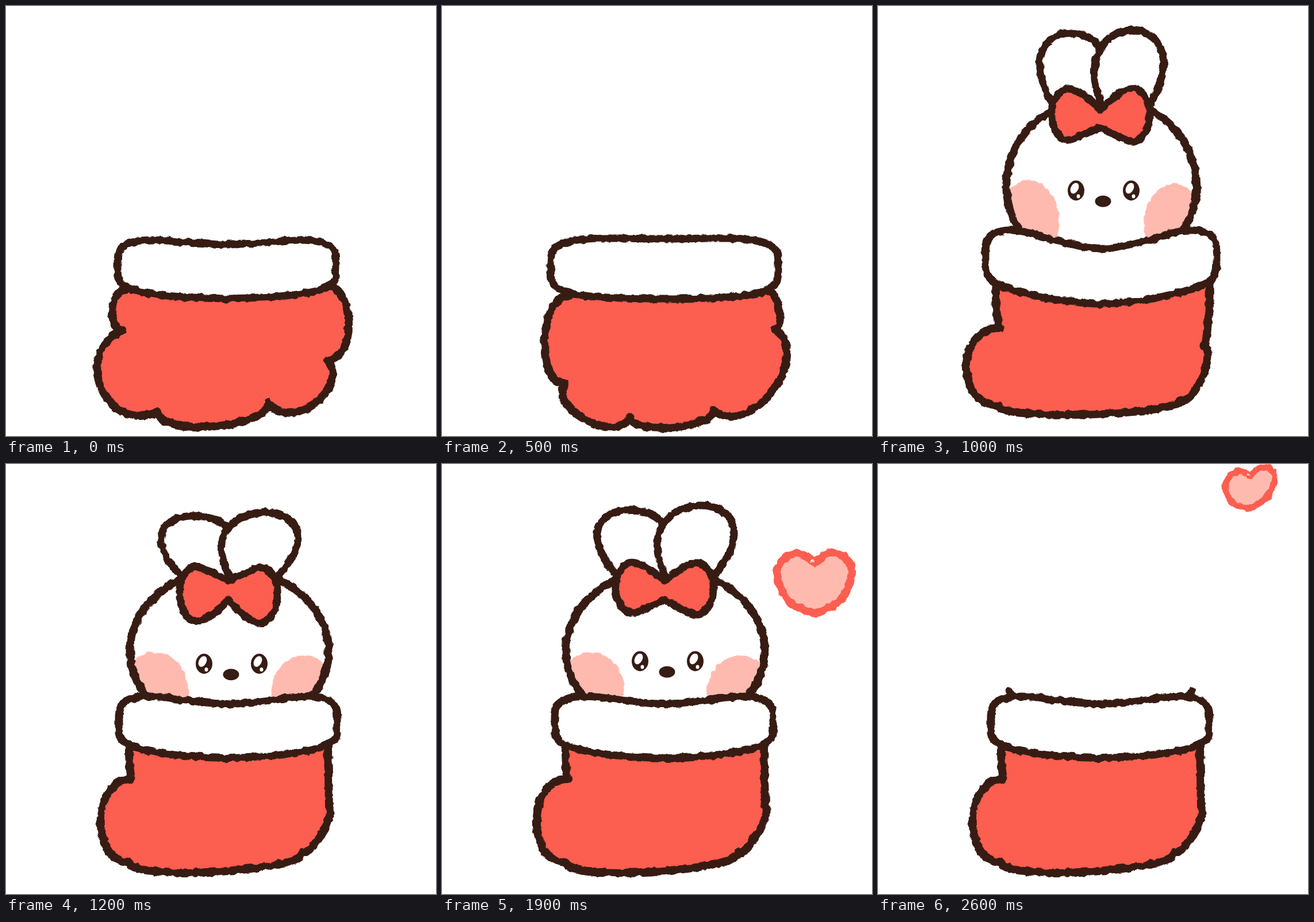
Recreate the animation shown at these times as an HTML page. Size 748 by 748 pixels, loop 2700 ms.

```html
<!DOCTYPE html>
<html lang="en">
<head>
<meta charset="utf-8">
<title>Bunny in a stocking</title>
<style>
  html, body { margin: 0; width: 100%; height: 100%; overflow: hidden; background: #fff; }
  svg { display: block; width: 100vw; height: 100vh; }
  .ink { stroke: #371c14; stroke-width: 14; stroke-linecap: round; stroke-linejoin: round; }
  .thin { stroke-width: 13; }
  .white { fill: #fff; }
  .red { fill: #fc5e50; }
  .pink { fill: #ffbab0; }
  .dark { fill: #371c14; }
  .none { fill: none; }
  #heart { stroke: #fc5e50; stroke-linejoin: round; }
</style>
</head>
<body>
<svg viewBox="0 0 748 748">
  <defs>
    <filter id="rough" filterUnits="userSpaceOnUse" x="0" y="0" width="748" height="748" color-interpolation-filters="sRGB">
      <feTurbulence id="noise" type="fractalNoise" baseFrequency=".09" numOctaves="2" seed="2"/>
      <feDisplacementMap in="SourceGraphic" scale="7" xChannelSelector="R" yChannelSelector="G"/>
    </filter>
    <clipPath id="inHead"><ellipse id="headClip"/></clipPath>
    <clipPath id="above"><rect y="-10" width="748" height="470"/></clipPath>
    <g id="eye">
      <ellipse class="dark" rx="14.5" ry="17.5"/>
      <ellipse class="white" rx="6.5" ry="10" transform="translate(-2.5 -4) rotate(28)"/>
      <ellipse class="white" cx="4" cy="10" rx="3" ry="3.6"/>
    </g>
  </defs>
  <g id="bunny" clip-path="url(#above)">
    <g filter="url(#rough)">
      <ellipse id="headFill" class="white"/>
      <g clip-path="url(#inHead)">
        <ellipse id="cheekL" class="pink"/>
        <ellipse id="cheekR" class="pink"/>
      </g>
      <ellipse id="head" class="ink none"/>
      <path id="earL" class="ink thin white"/>
      <path id="earR" class="ink thin white"/>
      <path id="bow" class="ink thin red"/>
    </g>
    <g id="face">
      <use href="#eye" x="344.5"/>
      <use href="#eye" x="440.5"/>
      <ellipse class="dark" cx="391.5" cy="18.8" rx="14" ry="10"/>
    </g>
  </g>
  <g filter="url(#rough)">
    <path id="nubs" class="ink thin none" d="M228 394l10 11M546 394l-10 11"/>
    <path id="body" class="ink red"/>
    <path id="cuff" class="ink thin white"/>
    <path id="heart" class="pink"/>
  </g>
</svg>
<script>
const $ = id => document.getElementById(id);
const { PI, sin, cos, abs, max, min, sign, hypot } = Math;
const attrs = (id, o) => { for (const k in o) $(id).setAttribute(k, o[k]); };
const show = (id, on) => { $(id).style.display = on ? '' : 'none'; };
const lerp = (a, b, w) => a + (b - a) * w;

// blends numbers, arrays and objects alike
function mix(a, b, w) {
  if (typeof a === 'number') return lerp(a, b, w);
  if (Array.isArray(a)) return a.map((v, i) => mix(v, b[i], w));
  return Object.fromEntries(Object.keys(a).map(k => [k, mix(a[k], b[k], w)]));
}

// body: corners [x, y] joined by arcs, each with its bulge
const lumpA = {
  body: [[208, 494], [203, 565, .38], [264, 706, .64], [456, 690, .23], [560, 616, .5], [556, 486, .39]],
  cuff: { x: 384, y: 462, w: 190, h: 47, bend: 14 }
};
const lumpB = {
  body: [[222, 504], [213, 657, .34], [327, 715, .41], [472, 703, .22], [580, 562, .46], [568, 497, .25]],
  cuff: { x: 387, y: 457, w: 198, h: 52, bend: 4 }
};
const bagUp = {
  body: [[200, 478], [206, 572, .1], [205, 698, .65], [540, 695, .055], [573, 590, .28], [590, 470, .09]],
  cuff: { x: 390, y: 476, w: 212, h: 49, bend: 66 }
};
const bagRest = {
  body: [[215, 490], [219, 548, .05], [215, 693, .48], [515, 676, .11], [562, 595, .18], [560, 487, 0]],
  cuff: { x: 386, y: 464.5, w: 190, h: 47, bend: 21 }
};

// ears: lean and height; bow wings: top and bottom
const up = {
  head: { x: 389, y: 300, w: 158, h: 165 }, cheek: { y: 351, w: 42, h: 70 }, face: 299,
  earY: 150, spread: 105, earL: [-5, 136], earR: [3, 138],
  knot: [157, 187], wingL: [118, 207], wingR: [115, 210]
};
const calm = {
  head: { x: 388.5, y: 325, w: 173, h: 142 }, cheek: { y: 394, w: 56, h: 64 }, face: 343,
  earY: 195, spread: 150, earL: [-27, 115], earR: [26, 123],
  knot: [203, 236], wingL: [172, 259], wingR: [173, 262]
};

const heartLow = { x: 659, y: 266, w: 48, h: 60, lean: -34, tilt: -.1, line: 14 };
const heartMid = { x: 648, y: 207, w: 65, h: 53, lean: 0, tilt: -.02, line: 14 };
const heartTop = { x: 647, y: 43, w: 43, h: 34, lean: 0, tilt: -.18, line: 11 };

// closed smooth curve; points are [x, y, sharp]
function loop(p) {
  const at = i => p[(i + p.length) % p.length];
  const ctrl = (i, dir) => [0, 1].map(k => at(i)[k] + (at(i)[2] ? 0 : (at(i + 1)[k] - at(i - 1)[k]) * dir / 6));
  return `M${p[0][0]} ${p[0][1]}` + p.map((_, i) =>
    'C' + [...ctrl(i, 1), ...ctrl(i + 1, -1), at(i + 1)[0], at(i + 1)[1]].map(v => v.toFixed(1)).join(' ')).join('');
}

function scallops(c) {
  return `M${c[0]}` + c.slice(1).map(([x, y, bulge], i) => {
    const [px, py] = c[i], nx = (py - y) * bulge, ny = (x - px) * bulge;
    return `C${px + nx} ${py + ny} ${x + nx} ${y + ny} ${x} ${y}`;
  }).join('');
}

// rounded bar whose ends curl upwards, the top edge more than the bottom
function bean({ x, y, w, h, bend }) {
  const round = v => sign(v) * abs(v) ** .5;
  return loop(Array.from({ length: 40 }, (_, i) => {
    const a = 2 * PI * i / 40, u = round(cos(a)), v = round(sin(a));
    return [x + w * u, y + h * v - bend * (1 - cos(PI * u)) / 2 * (.75 - .25 * v)];
  }));
}

function ear(side, baseY, spread, [lean, height]) {
  const inner = 389, outer = inner + side * 84, mid = (inner + outer) / 2 + lean;
  const top = baseY - height / .75;
  return `M${inner} ${baseY}C${mid - side * spread} ${top} ${mid + side * spread} ${top} ${outer} ${baseY}`;
}

function bow([top, bottom], left, right) {
  const wing = [[34, .08], [62, 0], [83, .28], [82, .72], [60, 1], [28, .88]];
  const place = (side, [a, b]) => wing.map(([x, v]) => [387 + side * x, lerp(a, b, v)]);
  return loop([[387, top, 1], ...place(-1, left), [387, bottom, 1], ...place(1, right).reverse()]);
}

function heart({ x, y, w, h, lean, tilt }) {
  const half = [[.4, -.97], [.78, -.85], [1, -.32], [.69, .58]];
  const put = (u, v, sharp) => [x + u * w + lean * max(0, v) ** 2, y + v * h + u * w * tilt, sharp];
  return loop([put(0, -.68, 1), ...half.map(([u, v]) => put(-u, v)),
    put(0, 1, 1), ...half.map(([u, v]) => put(u, v)).reverse()]);
}

const rise = s => max(0, 1 - abs(s - 8) / 4);

function bagAt(s) {
  return s < 7 ? mix(lumpA, lumpB, sin(.3 * PI * s) ** 2) : mix(bagRest, bagUp, rise(s));
}

function bunnyAt(s) {
  const b = mix(calm, up, s < 8 ? 1 : rise(s));
  const squash = max(0, 1 - abs(s - 12) / 2);
  const sway = s > 12 && s < 25 ? cos(PI * (s - 16) / 6) : 0;
  const shift = ([a, c], da, dc) => [a + da, c + dc];
  return {
    ...b,
    face: b.face + 4.5 * squash,
    earL: shift(b.earL, -14 * sway, -10 * squash - 15 * sway),
    earR: shift(b.earR, -22 * sway, -12 * squash),
    wingL: shift(b.wingL, 7 * squash + 8 * sway, 14 * squash + 8 * sway),
    wingR: shift(b.wingR, 7 * squash - 12 * sway, 14 * squash - 8 * sway)
  };
}

function heartAt(s) {
  const early = max(0, 16 - s), late = max(0, s - 19) / 7;
  const h = late ? mix(heartMid, heartTop, late) : mix(heartLow, heartMid, max(0, s - 16) / 3);
  return { ...h, x: h.x + 28 * (sin(early) + sin(PI * late)), y: h.y + 20 * early };
}

function drawBunny(s) {
  const b = bunnyAt(s), { x, y, w, h } = b.head;
  const dy = 80 * max(0, 8 - s) ** 2 + 28 * max(0, s - 23) ** 2;
  for (const id of ['headFill', 'headClip', 'head']) attrs(id, { cx: x, cy: y + dy, rx: w, ry: h });
  for (const [id, side] of [['cheekL', -1], ['cheekR', 1]]) {
    const cx = x + side * .74 * w, cy = b.cheek.y + side * 3 + dy;
    attrs(id, { cx, cy, rx: b.cheek.w, ry: b.cheek.h, transform: `rotate(${8 * side} ${cx} ${cy})` });
  }
  const lower = v => v + dy;
  attrs('earL', { d: ear(-1, b.earY + dy, b.spread, b.earL) });
  attrs('earR', { d: ear(1, b.earY + dy, b.spread, b.earR) });
  attrs('bow', { d: bow(b.knot.map(lower), b.wingL.map(lower), b.wingR.map(lower)) });
  attrs('face', { transform: `translate(0 ${b.face + dy})` });
}

function render(s) {
  attrs('noise', { seed: 2 + s % 2 });
  const bag = bagAt(s);
  attrs('body', { d: scallops(bag.body) });
  attrs('cuff', { d: bean(bag.cuff) });
  const out = s > 5 && s < 26;
  show('bunny', out);
  if (out) drawBunny(s);
  show('nubs', s === 26);
  show('heart', s > 12);
  if (s > 12) {
    const h = heartAt(s);
    attrs('heart', { d: heart(h), 'stroke-width': h.line });
  }
}

let last = -1;
const start = performance.now();
function tick() {
  const step = Math.floor(((performance.now() - start) % 2700) / 100);
  if (step !== last) render(last = step);
  requestAnimationFrame(tick);
}
tick();
</script>
</body>
</html>
```
